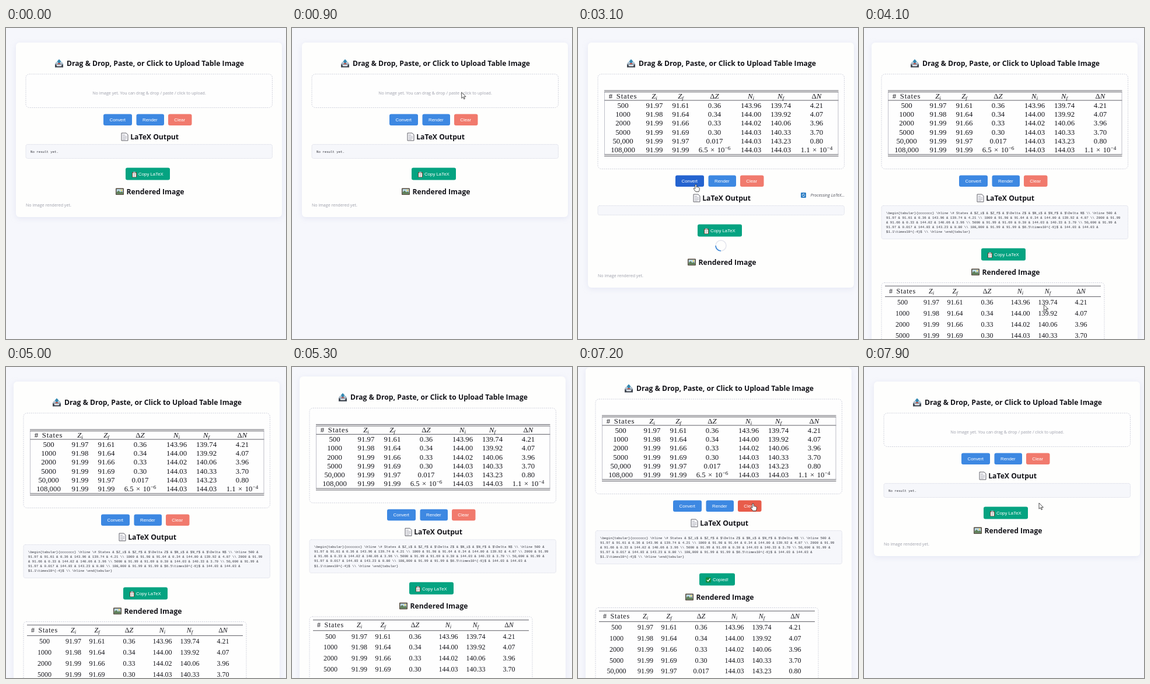
Animation, 480 px wide and 533 px high, one loop 8000 ms. Source, as an HTML page:

```html
<!DOCTYPE html>
<html lang="en">
<head>
<meta charset="utf-8">
<title>Table image to LaTeX</title>
<style>
  html, body { margin: 0; width: 100%; height: 100%; overflow: hidden; background: #f6f7fc; }
  svg { display: block; width: 480px; height: 533px; }
  text { white-space: pre; }
  .head { font: 700 12.2px "Open Sans", "Noto Sans", sans-serif; fill: #14141a; text-anchor: middle; }
  .note { font: 7.1px "Open Sans", "Noto Sans", sans-serif; fill: #9c9eaa; }
  .status { font: italic 7.2px "Open Sans", "Noto Sans", sans-serif; fill: #50525c; text-anchor: end; }
  .btn { font: 7.85px "Liberation Sans", Arial, sans-serif; fill: #fff; }
  .mono { font: 5.72px "Liberation Mono", "Noto Sans Mono", monospace; fill: #33343c; }
  .cells { font-family: "Liberation Serif", "Noto Serif", serif; fill: #16161c; text-anchor: middle; }
  .it { font-style: italic; }
  .dash { fill: #fefefe; stroke: #cfd1dc; stroke-dasharray: 2 1.5; }
  .box { fill: #f6f7fb; stroke: #d9dbe6; stroke-dasharray: 1.5 1; }
  #card { fill: #fefefd; filter: drop-shadow(0 2px 4px #d4d8ee80); }
</style>
</head>
<body>
<svg id="stage" viewBox="0 0 480 533"></svg>
<script>
const LOOP = 8000, STEP = 100;
const DROP = 1200, CONVERT = 2800, LATEX = 3400, IMAGE = 3600, COPY = 6200, CLEAR = 7400;
const BLUE = "#3d88e2", BLUE_HOT = "#2463cf", RED = "#f17a6d", RED_HOT = "#e85c4a", GREEN = "#05a381", GREEN_HOT = "#0a8270";

// Cursor tip and scroll offset: [time, values...]
const CURSOR = [
  [200, 490, 112], [1100, 262, 110], [1250, 262, 112], [1550, 259, 324], [1800, 259, 324],
  [2400, 202, 268], [3400, 202, 268], [3500, 247, 263], [3700, 247, 263], [4300, 330, 548],
  [5600, 300, 545], [6000, 250, 304], [6500, 250, 304], [7100, 300, 234], [8000, 300, 233]
];
const SCROLL = [[5200, 0], [5700, 83], [6600, 83], [7000, 24]];

const ROWS = [
  ["# States", "Z_i", "Z_f", "ΔZ", "N_i", "N_f", "ΔN"],
  "500 91.97 91.61 0.36 143.96 139.74 4.21".split(" "),
  "1000 91.98 91.64 0.34 144.00 139.92 4.07".split(" "),
  "2000 91.99 91.66 0.33 144.02 140.06 3.96".split(" "),
  "5000 91.99 91.69 0.30 144.03 140.33 3.70".split(" "),
  "50,000 91.99 91.97 0.017 144.03 143.23 0.80".split(" "),
  ["108,000", "91.99", "91.99", "6.5 × 10^−6", "144.03", "144.03", "1.1 × 10^−4"]
];

const CODE = String.raw`\begin{tabular}{ccccccc} \hline \# States & $Z_i$ & $Z_f$ & $\Delta Z$ & $N_i$ & $N_f$ & $\Delta N$ \\ \hline 500 &
91.97 & 91.61 & 0.36 & 143.96 & 139.74 & 4.21 \\ 1000 & 91.98 & 91.64 & 0.34 & 144.00 & 139.92 & 4.07 \\ 2000 & 91.99
& 91.66 & 0.33 & 144.02 & 140.06 & 3.96 \\ 5000 & 91.99 & 91.69 & 0.30 & 144.03 & 140.33 & 3.70 \\ 50,000 & 91.99 &
91.97 & 0.017 & 144.03 & 143.23 & 0.80 \\ 108,000 & 91.99 & 91.99 & $6.5\times10^{-6}$ & 144.03 & 144.03 &
$1.1\times10^{-4}$ \\ \hline \end{tabular}`.split("\n");

const esc = s => s.replace(/&/g, "&amp;").replace(/</g, "&lt;");
const text = (cls, x, y, s, extra = "") => `<text class="${cls}" x="${x}" y="${y}" ${extra}>${esc(s)}</text>`;
const rect = (x, y, w, h, fill, rx = 0, extra = "") =>
  `<rect x="${x}" y="${y}" width="${w}" height="${h}" rx="${rx}" fill="${fill}" ${extra}/>`;
const path = (d, fill, extra = "") => `<path d="${d}" fill="${fill}" ${extra}/>`;
const rule = (x1, x2, y) => path(`M${x1} ${y}H${x2}`, "none", 'stroke="#34343e" stroke-width=".8"');

function cell(s, x, y, size) {
  const small = (c, dy, cls) => `<tspan class="${cls}" dy="${dy}" font-size="${size * 0.72}">${c}</tspan>`;
  let body = s, extra = "";
  if (s[0] === "#") extra = 'letter-spacing=".8" word-spacing="1.8"';
  else if (s[0] === "Δ") body = `Δ<tspan class="it">${s[1]}</tspan>`;
  else if (s[1] === "_") body = `<tspan class="it">${s[0]}</tspan>` + small(s[2], 2, "it");
  else if (s.includes("^")) {
    const [base, power] = s.split("^");
    body = base + small(power, -4.5, "");
    extra = 'word-spacing="1.2"';
  }
  return `<text x="${x}" y="${y}" ${extra}>${body}</text>`;
}

function table(centers, size, headY, firstY, gap) {
  const cells = ROWS.map((row, r) => row.map((s, c) =>
    cell(s, centers[c], r ? firstY + gap * (r - 1) : headY, size)).join("")).join("");
  return `<g class="cells" font-size="${size}">${cells}</g>`;
}

function button(id, x, y, w, h, color, label, labelX) {
  return rect(x, y, w, h, color, 3, `id="${id}"`) + text("btn", labelX, y + h / 2 + 2.8, label);
}

const tray = path("M84 61h14v6.500h-14z", "#3f4650") + path("M85.500 58.500h11l1.500 4h-14z", "#a9bccb") +
  path("M86 63h10l-1.500 2.500h-7z", "#e2e6ec") + path("M91 53.500l4 4.500h-2.200v4h-3.600v-4h-2.200z", "#2f86b0") +
  path("M89.200 60h3.600v2h-3.600z", "#d2574a");
const sheet = path("M198 180h8l3 3v10h-11z", "#f5f5f7", 'stroke="#55565e" stroke-width=".9"') +
  path("M200 183.500h4M200 186h7M200 188.500h7M200 191h5", "none", 'stroke="#9a9ba6" stroke-width=".8"');
const picture = rect(188, 274.500, 14, 11.500, "#54483a", 1) + rect(189.500, 276, 11, 8.500, "#bcd8e4") +
  path("M189.500 284.500v-3l3.500-3 3 3 2-1.500 2.500 2v2.500z", "#5f8058") + `<circle cx="198" cy="278" r="1.200" fill="#f4d24c"/>`;
const clip = rect(216, 247, 8, 9, "#6b4430", 1) + rect(217, 248.500, 6, 6.800, "#f4f4f4") +
  rect(218, 246.300, 4, 2, "#a9aeb4", 0.6) + path("M218 250.500h4M218 252h4M218 253.500h3", "none", 'stroke="#888" stroke-width=".5"');
const check = rect(219, 246.500, 9, 9, "#158a3c", 1.2) +
  path("M221 251l2 2 3.500-4.500", "none", 'stroke="#fff" stroke-width="1.300"');
const sync = rect(382, 177, 9, 9, "#2f7fc5", 1.3) +
  path("M384.300 181.500a2.300 2.300 0 0 1 4-1.300M388.800 181.500a2.300 2.300 0 0 1-4 1.300", "none", 'stroke="#fff" stroke-width="1"');

const arrow = path("M0 0v10.200l2.400-2.200 1.700 3.700 1.500-.7-1.600-3.500h3.300z", "#fff", 'stroke="#222" stroke-width=".8"');
const hand = path("M-1.200 1.200a1.200 1.200 0 0 1 2.400 0v3.600l1.300-.4 1.300.6 1.300.1 1.100 1.100v3.200l-1.200 3.200h-5.200l-3.300-4.600c-.8-1.300.6-2.200 1.500-1.300l.8.8z",
  "#fff", 'stroke="#222" stroke-width=".8"');
const busy = `<circle cx="8" cy="0" r="3.700" fill="#d8eefa" stroke="#2385cc" stroke-width="2"/>`;

const arc = "M-6.360 -6.360A9 9 0 0 1 6.360 -6.360";
document.getElementById("stage").innerHTML = `
<g id="page">
  <rect id="card" x="17" y="25" width="456" rx="6"/>
  ${tray}${text("head", 256, 64.5, "Drag & Drop, Paste, or Click to Upload Table Image")}
  <rect id="zone" class="dash" x="34" y="79" width="422.500" rx="6"/>
  ${text("note", 245.5, 113.5, "No image yet. You can drag & drop / paste / click to upload.", 'id="hint" text-anchor="middle"')}
  <g id="input">
    ${[107.2, 109.7, 124, 216.8, 219.5].map(y => rule(45, 446.5, y)).join("")}
    ${path("M45.500 110v107M446 110v107", "none", 'stroke="#9496a4" stroke-width=".6"')}
    ${table([77, 131, 176, 234, 296.5, 347.5, 409], 12.8, 120.7, 136.6, 15.3)}
  </g>
  <g id="middle">
    ${button("convert", 167, 147.5, 49, 19.5, BLUE, "Convert", 177.5)}
    ${button("render", 223.5, 147.5, 47.5, 19.5, BLUE, "Render", 234)}
    ${button("clear", 278, 147.5, 40.5, 19.5, RED, "Clear", 288.3)}
    ${sheet}${text("head", 254.7, 190.5, "LaTeX Output")}
    <g id="status">${sync}${text("status", 457, 184, "Processing LaTeX...")}</g>
    <rect id="box" class="box" x="34" y="199.500" width="422.500" rx="3"/>
    ${text("mono", 42, 214, "", 'id="line"')}
    <g id="code">${CODE.map((s, i) => text("mono", 42, 213.8 + i * 8.1, s)).join("")}</g>
  </g>
  <g id="copyRow">
    <rect id="copy" y="239.500" height="21" rx="3"/>
    <g id="copyLabel">${clip}${text("btn", 227, 253.3, "Copy LaTeX")}</g>
    <g id="doneLabel" transform="translate(4 0)">${check}${text("btn", 231, 253.3, "Copied!")}</g>
  </g>
  <g id="spinner">
    <circle r="9" fill="none" stroke="#e4e6ee" stroke-width="1.500"/>
    <path id="arc" d="${arc}" fill="none" stroke="#3d88d8" stroke-width="1.700"/>
  </g>
  <g id="result">
    ${picture}${text("head", 256, 284.5, "Rendered Image")}
    ${text("note", 34, 306, "No image rendered yet.", 'id="none"')}
    <g id="output">
      <rect class="dash" x="34" y="298.500" width="382" height="143" rx="5"/>
      ${[304.2, 322.4, 434.6].map(y => rule(40, 410, y)).join("")}
      ${table([70, 119.5, 160, 215, 272, 319, 376], 12, 316.7, 336.4, 18.7)}
    </g>
  </g>
</g>
<g id="cursor"><g id="arrow">${arrow}</g><g id="hand">${hand}</g><g id="busy">${busy}</g></g>`;

const el = {};
document.querySelectorAll("[id]").forEach(n => el[n.id] = n);
const show = (id, on) => el[id].setAttribute("display", on ? "inline" : "none");
const move = (id, x, y) => el[id].setAttribute("transform", `translate(${x} ${y})`);
const set = (id, name, value) => el[id].setAttribute(name, value);

function track(keys, t) {
  if (t <= keys[0][0]) return keys[0].slice(1);
  for (let i = 1; i < keys.length; i++) {
    const [a, b] = [keys[i - 1], keys[i]];
    if (t > b[0]) continue;
    const p = (t - a[0]) / (b[0] - a[0]), e = p * p * (3 - 2 * p);
    return a.slice(1).map((v, k) => v + (b[k + 1] - v) * e);
  }
  return keys[keys.length - 1].slice(1);
}

function draw(t) {
  const live = t < CLEAR;
  const dropped = live && t >= DROP;
  const working = t >= CONVERT && t < LATEX;
  const coded = live && t >= LATEX;
  const imaged = live && t >= IMAGE;
  const copied = live && t >= COPY;

  const dy = dropped ? 105 : 0;
  const boxH = working ? 16 : coded ? 57 : 24;
  const copyDy = dy + boxH - 24;
  const resultDy = copyDy + (working ? 24 : 0);
  const pageX = imaged ? -4 : 0;
  const pageY = live ? -track(SCROLL, t)[0] : 0;
  const [copyX, copyW] = copied ? [212, 61] : [205, 76];

  move("page", pageX, pageY);
  set("card", "height", 299 + resultDy + (imaged ? 133 : 0));
  set("zone", "height", 57.5 + dy);
  show("hint", !dropped);
  show("input", dropped);
  move("middle", 0, dy);
  show("status", working);
  set("box", "height", boxH);
  el.line.textContent = dropped ? "Image dropped. Ready to convert." : "No result yet.";
  show("line", !working && !coded);
  show("code", coded);

  move("copyRow", 0, copyDy);
  set("copy", "x", copyX);
  set("copy", "width", copyW);
  show("copyLabel", !copied);
  show("doneLabel", copied);

  show("spinner", working);
  move("spinner", 245, 276 + copyDy);
  set("arc", "transform", `rotate(${225 + (t - 3100) * 0.36})`);
  move("result", 0, resultDy);
  show("none", !imaged);
  show("output", imaged);

  const [x, y] = track(CURSOR, t);
  const over = (left, top, w, h) => {
    const px = x - pageX - left, py = y - pageY - top;
    return px >= 0 && px <= w && py >= 0 && py <= h;
  };
  const hot = {
    convert: over(167, 147.5 + dy, 49, 19.5),
    render: over(223.5, 147.5 + dy, 47.5, 19.5),
    clear: over(278, 147.5 + dy, 40.5, 19.5),
    copy: over(copyX, 239.5 + copyDy, copyW, 21)
  };
  set("convert", "fill", hot.convert ? BLUE_HOT : BLUE);
  set("render", "fill", hot.render ? BLUE_HOT : BLUE);
  set("clear", "fill", hot.clear ? RED_HOT : RED);
  set("copy", "fill", hot.copy ? GREEN_HOT : GREEN);

  const pointing = Object.values(hot).some(Boolean);
  move("cursor", x, y);
  show("hand", pointing);
  show("arrow", !pointing);
  show("busy", t >= DROP && t < 1900);
}

const start = performance.now();
function tick() {
  const t = (performance.now() - start) % LOOP;
  draw(Math.floor(t / STEP) * STEP);
  requestAnimationFrame(tick);
}
tick();
</script>
</body>
</html>
```
